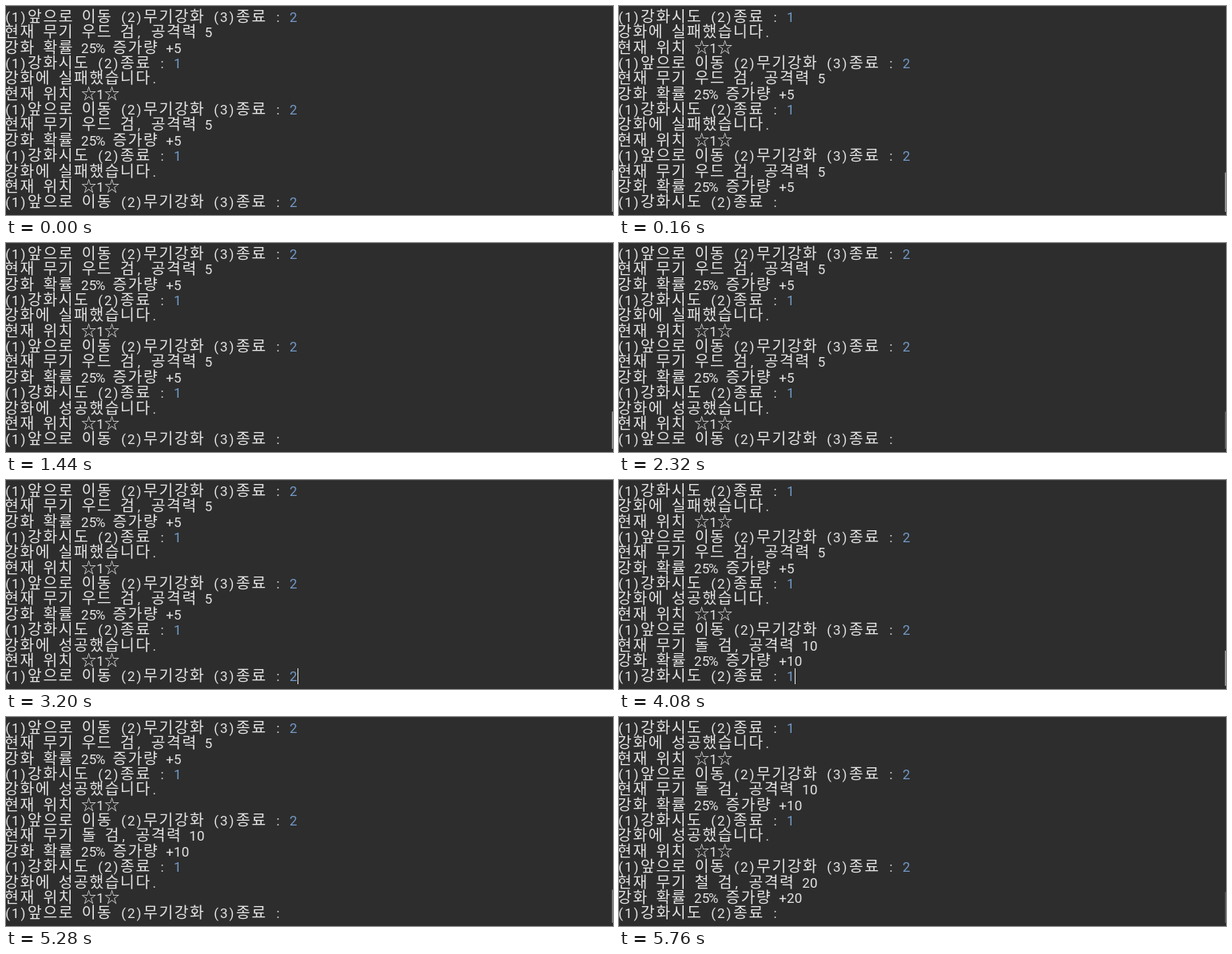
An HTML page with a canvas for the animation above (5.84 s loop, 760 px wide and 262 px high).

```html
<!DOCTYPE html>
<html lang="ko">
<head>
<meta charset="utf-8">
<style>
  html, body { margin: 0; width: 100%; height: 100%; overflow: hidden; background: #2d2d2d; }
  canvas { display: block; }
</style>
</head>
<body>
<canvas width="760" height="262"></canvas>
<script>
const ctx = document.querySelector('canvas').getContext('2d');
const LOOP = 5840, TICK = 80, ROWS = 13;
const CELL = 9.667, PITCH = 19.35, LEFT = -2.7, BASELINE = 20;
const BACKGROUND = '#2d2d2d', TEXT = '#e4e4e4', INPUT = '#7299c6';
const WIDE_FONT = '500 19.3px "Noto Sans Mono CJK KR", "Noto Sans CJK KR", sans-serif';
const NARROW_FONT = '17px Roboto, "Noto Sans", sans-serif';

// Each log line is [output, typed answer].
const round = (weapon, power, result) => [
  ['(1)앞으로 이동 (2)무기강화 (3)종료 : ', '2'],
  [`현재 무기 ${weapon} 검, 공격력 ${power}`, ''],
  [`강화 확률 25% 증가량 +${power}`, ''],
  ['(1)강화시도 (2)종료 : ', '1'],
  [`강화에 ${result}했습니다.`, ''],
  ['현재 위치 ☆1☆', '']
];
const log = [
  ...round('우드', 5, '실패'),
  ...round('우드', 5, '실패'),
  ...round('우드', 5, '성공'),
  ...round('돌', 10, '성공'),
  ...round('철', 20, '성공')
];

// Each prompt: when it is printed, answered and confirmed with Enter.
const prompts = [
  { shown: -1, typed: -1, enter: 80 },
  { shown: 160, typed: 960, enter: 1200 },
  { shown: 1280, typed: 3200, enter: 3280 },
  { shown: 3360, typed: 4080, enter: 4240 },
  { shown: 4320, typed: 5440, enter: 5680 },
  { shown: 5760, typed: LOOP, enter: LOOP }
];

const ramp = (t, from, to) => Math.min(1, Math.max(0, (t - from) / (to - from)));

// Draws on the terminal grid, wide characters taking two cells; returns the end x.
function drawText(text, x, y, color) {
  ctx.fillStyle = color;
  for (const char of text) {
    const wide = char > '\u00ff';
    const width = wide ? 2 * CELL : CELL;
    ctx.font = wide ? WIDE_FONT : NARROW_FONT;
    ctx.fillText(char, x + width / 2, y);
    x += width;
  }
  return x;
}

function drawScrollbar(t, lines) {
  const alpha = 1 - ramp(t, 2240, 2400) + ramp(t, 3440, 3680)
    - ramp(t, 5200, 5520) + 0.4 * ramp(t, 5680, 5760);
  const top = 206 + (lines - ROWS) * 0.88;
  ctx.globalAlpha = alpha;
  ctx.fillStyle = '#a4a4a4';
  ctx.fillRect(758.7, top, 1.3, 258 - top);
  ctx.globalAlpha = 1;
}

function draw(t) {
  const index = prompts.findLastIndex(p => t >= p.shown);
  const { typed, enter } = prompts[index];
  const count = ROWS + index * 3;
  const entered = t >= enter;
  const first = count - ROWS + entered;

  ctx.fillStyle = BACKGROUND;
  ctx.fillRect(0, 0, 760, 262);
  ctx.fillStyle = '#363636';
  ctx.fillRect(0, 0, 760, 1);
  ctx.textAlign = 'center';

  for (let i = first; i < count; i++) {
    const [output, answer] = log[i];
    const y = BASELINE + (i - first) * PITCH;
    const x = drawText(output, LEFT, y, TEXT);
    if (i === count - 1 && t < typed) continue;
    const end = drawText(answer, x, y, INPUT);
    if (i === count - 1 && typed >= 0 && !entered) {
      ctx.fillStyle = TEXT;
      ctx.fillRect(Math.round(end), 236, 1, 20);
    }
  }
  drawScrollbar(t, count);
}

function frame() {
  const t = performance.now() % LOOP;
  draw(Math.floor(t / TICK) * TICK);
  requestAnimationFrame(frame);
}
frame();
</script>
</body>
</html>
```
